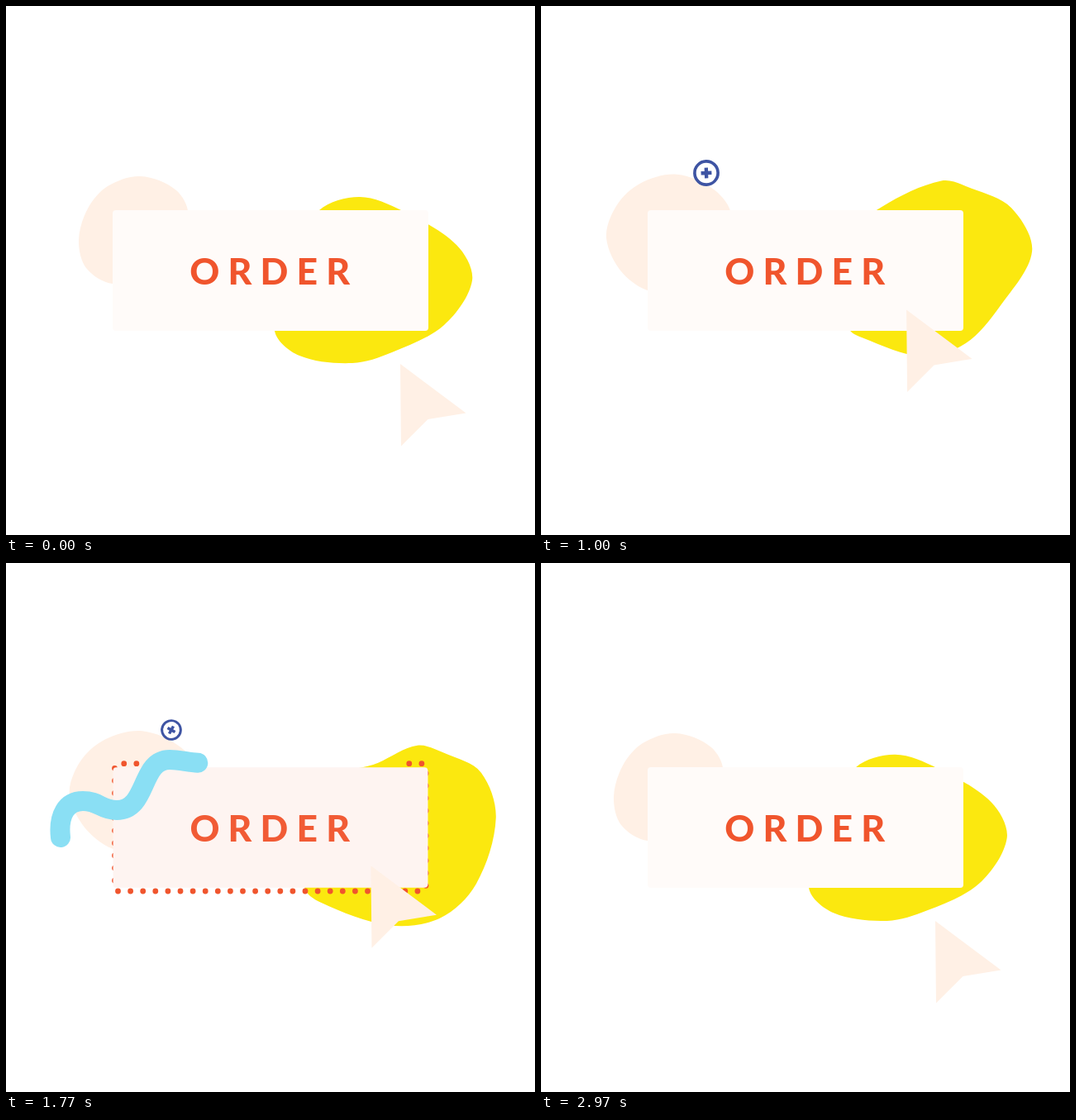
An HTML page for the animation above (3010 ms loop, 640 by 640 pixels).

```html
<!DOCTYPE html>
<html lang="en">
<head>
<meta charset="utf-8">
<title>Order button</title>
<style>
  :root { --loop: 3010ms infinite; --sine: cubic-bezier(.37, 0, .63, 1); }
  html, body { margin: 0; width: 100%; height: 100%; overflow: hidden; background: #fff; }
  svg { display: block; width: 100%; height: 100%; }

  .pale { fill: #fff0e5; }
  #yellow { fill: #fbe80f; }
  #dots { fill: none; stroke: #f0552d; stroke-width: 6.8; stroke-linecap: round; }

  #button { transform-origin: 320px 320px; animation: press var(--loop) var(--sine); }
  #button rect { fill: #fffbf9; animation: fill var(--loop) var(--sine); }
  #button text {
    font: 800 44.5px Lato, "Open Sans", sans-serif;
    letter-spacing: 10.2px; text-anchor: middle;
    fill: #f0552d;
    animation: ink var(--loop) var(--sine);
  }
  @keyframes press {
    0%, 38.54%, 60.13%, 100% { scale: 1; }
    48.5%, 50.17% { scale: .93; }
  }
  @keyframes fill {
    0%, 38.54%, 60.13%, 100% { fill: #fffbf9; }
    48.5%, 50.17% { fill: #f0552d; }
  }
  @keyframes ink {
    0%, 38.54%, 60.13%, 100% { fill: #f0552d; }
    48.5%, 50.17% { fill: #fff3ea; }
  }

  #plus { translate: 200px 202px; animation: pop var(--loop) linear; }
  #plus circle { fill: #fff; stroke: #3e54a3; stroke-width: 3.7; }
  #plus path { stroke: #3e54a3; stroke-width: 4.4; }
  @keyframes pop {
    0%, 12.29% { scale: 0; rotate: -140deg; }
    33.55% { scale: 1; rotate: 0deg; }
    48.84% { scale: 1; rotate: 0deg; animation-timing-function: cubic-bezier(.37, 0, .63, 1); }
    82.06%, 100% { scale: 0; rotate: 140deg; }
  }

  #wave {
    fill: none; stroke: #8adff4; stroke-width: 24; stroke-linecap: round;
    stroke-dasharray: 350 999;
    animation: draw var(--loop) linear, show var(--loop) step-end;
  }
  @keyframes draw {
    0%, 42.69% { stroke-dashoffset: 350; }
    52.16% { stroke-dashoffset: 217; }
    58.8% { stroke-dashoffset: 117.5; animation-timing-function: cubic-bezier(.3, .45, .6, 1); }
    68.44% { stroke-dashoffset: 0; animation-timing-function: cubic-bezier(.37, 0, .63, 1); }
    89.7%, 100% { stroke-dashoffset: -350; }
  }
  @keyframes show {
    0% { visibility: hidden; }
    42.7% { visibility: visible; }
    89.65%, 100% { visibility: hidden; }
  }

  #cursor { animation: travel var(--loop), click var(--loop) var(--sine); }
  @keyframes travel {
    0% { translate: 477px 433px; animation-timing-function: cubic-bezier(.4, 0, .55, 1); }
    39.87% { translate: 440.3px 364px; }
    54.82% { translate: 440.3px 364px; animation-timing-function: cubic-bezier(.33, 0, .33, 1); }
    97.34%, 100% { translate: 477px 433px; }
  }
  @keyframes click {
    0%, 39.53%, 58.47%, 100% { scale: 1; }
    43.19%, 47.18% { scale: .9; }
  }
</style>
</head>
<body>
<svg viewBox="0 0 640 640">
  <defs>
    <path id="rail" d="M504 242.7H135.5a4 4 0 0 0-4 4V393a4 4 0 0 0 4 4H504a4 4 0 0 0 4-4V246.7a4 4 0 0 0-4-4z"/>
  </defs>
  <path id="pale" class="pale"/>
  <path id="yellow"/>
  <path id="dots"/>
  <g id="button">
    <rect x="129" y="247" width="382" height="146" rx="4"/>
    <text x="324.3" y="336.8">ORDER</text>
  </g>
  <g id="plus">
    <circle r="14.3"/>
    <path d="M-6.5 0H6.5M0-6.5V6.5"/>
  </g>
  <path id="wave" pathLength="350" d="M66 332C63 305 73 288 93 288S115 299 134 299C172 299 162 238 198 238C212 238 222 242 238 242C275 242 258 187 296 187C304 187 312 190 318 195"/>
  <path id="cursor" class="pale" d="M0 0L79.5 59.5L33.5 67L1 99.5z"/>
</svg>
<script>
const LOOP = 3010, GAP = 15.1;
const $ = id => document.getElementById(id);

// Key outlines, evenly spaced over the loop, as x,y pairs
const paleKeys = [
  [163,206, 206,223, 220,255, 185,327, 129,336, 97,317, 88,283, 99,245, 123,218],
  [165,203, 212,223, 233,256, 195,340, 141,350, 100,326, 76,280, 89,240, 120,213]
];
const yellowKeys = [
  [379,247, 428,231, 480,248, 545,289, 564,332, 530,386, 467,419, 419,432, 355,423, 325,393, 335,310],
  [395,246, 469,215, 507,224, 559,249, 587,301, 545,362, 500,406, 451,423, 384,404, 364,390, 353,300],
  [443,239, 498,214, 536,226, 580,251, 597,303, 570,378, 527,421, 468,432, 386,406, 370,390, 380,266],
  [436,249, 477,234, 509,241, 554,262, 578,321, 553,400, 504,438, 443,445, 368,420, 339,393, 385,283]
];

// Trigonometric interpolation: smooth, periodic, exact at every key
function blend(keys, phase) {
  const n = keys.length;
  const weights = keys.map((_, k) => {
    const a = 2 * Math.PI * (phase - k / n);
    let w = 1 + Math.cos(a * n / 2);
    for (let m = 1; m < n / 2; m++) w += 2 * Math.cos(m * a);
    return w / n;
  });
  return keys[0].map((_, j) => keys.reduce((sum, key, k) => sum + key[j] * weights[k], 0));
}

// Closed curve through the points, handles scaled by chord length
function outline(flat) {
  const n = flat.length / 2;
  const pt = i => [flat[(i + n) % n * 2], flat[(i + n) % n * 2 + 1]];
  const dist = (a, b) => Math.hypot(b[0] - a[0], b[1] - a[1]);
  const handle = (i, side) => {
    const a = pt(i - 1), b = pt(i), c = pt(i + 1);
    const before = dist(a, b), after = dist(b, c);
    const k = (side > 0 ? after : -before) / 3 / (before + after);
    return [b[0] + (c[0] - a[0]) * k, b[1] + (c[1] - a[1]) * k];
  };
  const show = p => p.map(x => x.toFixed(2)).join(" ");
  let d = "M" + show(pt(0));
  for (let i = 0; i < n; i++) {
    d += "C" + [handle(i, 1), handle(i + 1, -1), pt(i + 1)].map(show).join(" ");
  }
  return d + "z";
}

// Dotted border: the head runs ahead, the tail catches up
const rail = $("rail"), railLength = rail.getTotalLength();
const run = [
  { at: 1070, tail: 0, head: 0 },
  { at: 1270, tail: 87, head: 634 },
  { at: 1570, tail: 499, head: 1453 },
  { at: 1770, tail: 1340.5, head: 2129 },
  { at: 1960, tail: 2400, head: 2400 }
];

function dots(t) {
  const next = run.findIndex(key => key.at > t);
  if (next < 1) return "";
  const a = run[next - 1], b = run[next], u = (t - a.at) / (b.at - a.at);
  const between = name => a[name] + (b[name] - a[name]) * u;
  const head = between("head");
  let d = "";
  for (let s = between("tail"); s <= head; s += GAP) {
    const p = rail.getPointAtLength(s % railLength);
    d += `M${p.x.toFixed(2)} ${p.y.toFixed(2)}h.01`;
  }
  return d;
}

let start;
function frame(now) {
  start ??= now;
  const t = Math.max(0, now - start) % LOOP;
  $("pale").setAttribute("d", outline(blend(paleKeys, t / LOOP)));
  $("yellow").setAttribute("d", outline(blend(yellowKeys, t / LOOP)));
  $("dots").setAttribute("d", dots(t));
  requestAnimationFrame(frame);
}
requestAnimationFrame(frame);
</script>
</body>
</html>
```
